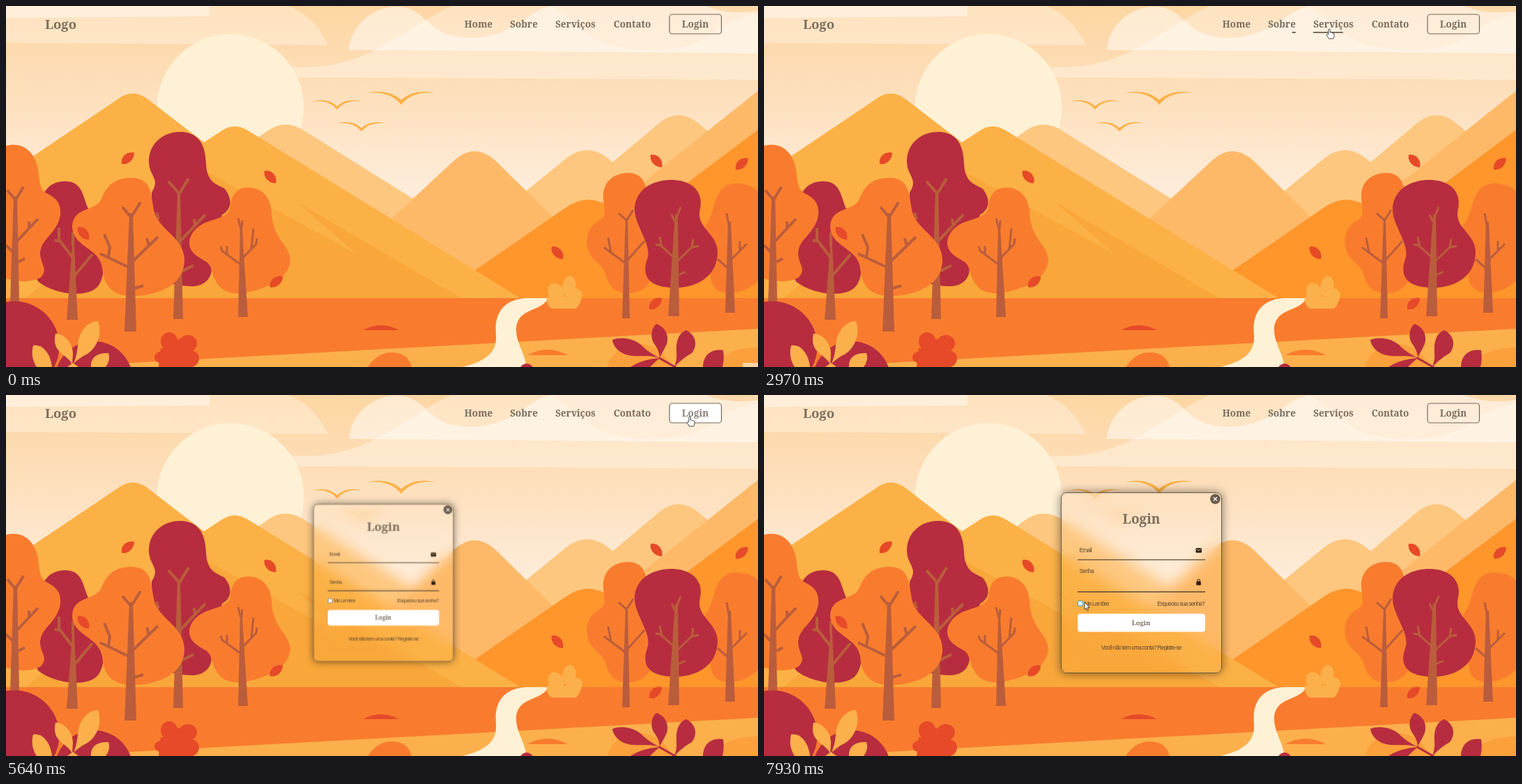
These frames come from a looping animation (1079 by 519 pixels, 8000 ms). An HTML page:

```html
<!DOCTYPE html>
<html lang="pt">
<head>
<meta charset="utf-8">
<title>Login</title>
<style>
html, body { margin: 0; width: 100%; height: 100%; overflow: hidden; background: #feebd6; }
body { position: relative; }
svg { position: absolute; left: 0; top: 0; overflow: hidden; }
text { font: 700 13.5px "Noto Serif", "DejaVu Serif", serif; fill: #7a6c5d; }
.mid { text-anchor: middle; }

.gold { fill: #fcb146; }
.sand { fill: #fdc77f; }
.peach { fill: #feb968; }
.amber { fill: #fe962c; }
.orange { fill: #f97c2e; }
.wine { fill: #b72d3f; }
.red { fill: #e64a28; }
.cream { fill: #fef1d5; }
.wood { fill: #ba5d3c; stroke: none; }
.twigs { fill: none; stroke: #ba5d3c; stroke-width: 4; }
.thin { stroke-width: 3; }
.cloud { fill: #fff; }

.line { position: absolute; top: 37px; height: 2px; background: #7a6c5d; animation: 8s ease infinite; }
#home { left: 658px; width: 40px; animation-name: home; }
#sobre { left: 723px; width: 40px; animation-name: sobre; }
#servicos { left: 788px; width: 58px; animation-name: servicos; }
#contato { left: 871px; width: 55px; animation-name: contato; }
@keyframes home {
  0%, 15.375% { clip-path: inset(0 100% 0 0); }
  21.625%, 24.5% { clip-path: inset(0 0 0 0); }
  30.75%, 100% { clip-path: inset(0 0 0 100%); }
}
@keyframes sobre {
  0%, 25.375% { clip-path: inset(0 100% 0 0); }
  31.625%, 33.5625% { clip-path: inset(0 0 0 0); }
  39.8125%, 100% { clip-path: inset(0 0 0 100%); }
}
@keyframes servicos {
  0%, 34.375% { clip-path: inset(0 100% 0 0); }
  40.625%, 43.125% { clip-path: inset(0 0 0 0); }
  49.375%, 100% { clip-path: inset(0 0 0 100%); }
}
@keyframes contato {
  0%, 45.25% { clip-path: inset(0 100% 0 0); }
  51.5%, 53.375% { clip-path: inset(0 0 0 0); }
  59.625%, 100% { clip-path: inset(0 0 0 100%); }
}

#enter rect { stroke: #756a5e; stroke-width: 1.2; fill: transparent; animation: enter 8s step-end infinite; }
#enter text { animation: enterText 8s step-end infinite; }
@keyframes enter { 0%, 71.875% { fill: transparent; } 65.3% { fill: #fff; } }
@keyframes enterText { 0%, 71.875% { fill: #7a6c5d; } 65.3% { fill: #8c8078; } }

#corner { animation: corner 8s step-end infinite; }
@keyframes corner { 0% { opacity: 1; } .875%, 100% { opacity: 0; } }

#modal {
  position: absolute; left: 426px; top: 139.5px; width: 231px; height: 260px; box-sizing: border-box;
  border: 1.4px solid #6b5b45; border-radius: 8px; box-shadow: 0 0 14px rgba(0, 0, 0, .5);
  backdrop-filter: blur(10px); animation: open 8s ease infinite;
}
#modal svg { left: -1px; top: -1px; }
@keyframes open {
  0%, 66.875% { transform: scale(0); }
  73.125%, 100% { transform: scale(1); }
}
.small { font: 8.3px "Liberation Sans", Arial, sans-serif; letter-spacing: -.75px; fill: #5e4a33; }
.rule { stroke: #5b4a35; stroke-width: 1.3; }
.icon { fill: #2e2012; }
#email { animation: email 8s ease infinite; }
#senha { animation: senha 8s ease infinite; }
@keyframes email {
  0%, 80% { transform: none; }
  86.25%, 90.5% { transform: translateY(-16px); }
  96.75%, 100% { transform: none; }
}
@keyframes senha {
  0%, 90.5% { transform: none; }
  96.75%, 100% { transform: translateY(-16px); }
}
#check { fill: #fff; stroke: #777; stroke-width: .9; animation: check 8s step-end infinite; }
@keyframes check { 0% { stroke: #777; } 97.5%, 100% { stroke: #2a8fc9; } }

#cursor { animation: move 8s linear infinite; }
#cursor path { fill: #fff; stroke: #333; stroke-width: .9; stroke-linejoin: round; }
#arrow { animation: arrow 8s step-end infinite; }
#hand { animation: hand 8s step-end infinite; }
#beam { animation: beam 8s step-end infinite; }
#cursor #beam path { fill: none; stroke: #222; stroke-width: 1; }
@keyframes move {
  0% { transform: translate(1079px, 525px); }
  .875% { transform: translate(1068px, 516px); }
  5%, 7.5% { transform: translate(661px, 266px); }
  15.375% { transform: translate(686px, 36px); }
  17%, 23.4% { transform: translate(688px, 34px); }
  24.5% { transform: translate(702px, 34px); }
  27.5% { transform: translate(735px, 33px); }
  30% { transform: translate(742px, 34px); }
  33.5625% { transform: translate(766px, 34px); }
  37.125% { transform: translate(811px, 33px); }
  41.25% { transform: translate(820px, 34px); }
  43.125% { transform: translate(847px, 34px); }
  48.375% { transform: translate(897px, 34px); }
  51.25% { transform: translate(905px, 34px); }
  53.375% { transform: translate(927px, 38px); }
  56% { transform: translate(948px, 46px); }
  58.75%, 71% { transform: translate(981px, 31px); }
  75.125% { transform: translate(608px, 208px); }
  76.625% { transform: translate(543.5px, 217px); }
  80% { transform: translate(512px, 220px); }
  85.375% { transform: translate(507px, 247px); }
  88%, 90.5% { transform: translate(522px, 268px); }
  99.125%, 100% { transform: translate(460px, 298px); }
}
@keyframes arrow {
  0%, 24.5%, 33.5625%, 43.125%, 53.375%, 71.875%, 95%, 100% { opacity: 1; }
  15.375%, 25.375%, 34.375%, 45.25%, 58.125%, 75.125% { opacity: 0; }
}
@keyframes hand {
  0%, 24.5%, 33.5625%, 43.125%, 53.375%, 71.875%, 100% { opacity: 0; }
  15.375%, 25.375%, 34.375%, 45.25%, 58.125% { opacity: 1; }
}
@keyframes beam { 0%, 95%, 100% { opacity: 0; } 75.125% { opacity: 1; } }
</style>
</head>
<body>
<svg width="1079" height="519" viewBox="0 0 1079 519">
  <defs>
    <linearGradient id="sky" x2="0" y2="1">
      <stop stop-color="#fdd6a3"/><stop offset=".5" stop-color="#fde0bd"/><stop offset="1" stop-color="#feeddb"/>
    </linearGradient>
    <path id="leaf" class="red" d="M-12 0C-8-8 5-10 12 0C6 7-6 8-12 0Z"/>
    <path id="bird" class="gold" d="M-35-12Q-13-17 0-5Q13-17 35-12Q11-14.500 0 0Q-11-14.500-35-12Z"/>
  </defs>
  <rect width="1079" height="270" fill="url(#sky)"/>

  <!-- clouds -->
  <path class="cloud" opacity=".3" d="M0 0H405C432 10 450 32 462 56L0 53Z"/>
  <path class="cloud" opacity=".4" d="M0 0H292V15L0 17Z"/>
  <path class="cloud" opacity=".32" d="M340 70C400 95 470 95 530 63C585 34 610 12 640 0H1079V106L340 102Z"/>
  <path class="cloud" opacity=".5" d="M492 63C495 28 525 1 560 1C598 1 602 30 632 40C680 56 722 36 748 17C762 6 775 0 790 0H1079V68Z"/>
  <path fill="#fde3c6" opacity=".35" d="M782 0C812 18 826 40 856 52C905 70 975 68 1010 42C1035 24 1058 14 1079 12V0Z"/>
  <path fill="#fdd9ab" d="M1004 0Q1040 14 1079 7V0Z"/>

  <circle class="cream" cx="322" cy="146" r="105.5"/>

  <!-- mountains -->
  <path class="sand" d="M340 205L376 179Q400 163 425 177.500L640 312V420H340Z"/>
  <path class="sand" d="M690 312L805 218Q833 197 861 217L900 247V420H690Z"/>
  <path class="sand" d="M820 267L940 166Q965 148 990 166L1040 206V420H820Z"/>
  <path class="peach" d="M430 420L643 222Q673 195 703 223L905 422Z"/>
  <path class="peach" d="M1079 122L790 353V420H1079Z"/>
  <path class="amber" d="M1079 178L850 350V420H1079Z"/>
  <path class="amber" d="M615 420L803 290Q832 269 862 286L1000 380V420Z"/>
  <path class="gold" d="M0 242L162 133Q183 118 204 134.500L284 196L310 179Q328 167 347 179L738 420H0Z"/>
  <path fill="#f9a73a" d="M285 237L502 356L418 282L653 420H28L130 335Z"/>

  <use href="#bird" x="475" y="149"/>
  <use href="#bird" transform="translate(567 142) scale(1.4)"/>
  <use href="#bird" x="510" y="180.500"/>

  <!-- ground -->
  <path class="orange" d="M0 420H1079V519H0Z"/>
  <path fill="#fcb04c" d="M0 523L180 513L1079 464V519H0Z"/>
  <path class="cream" d="M778 420H745C707 423 701 450 703 472C705 496 692 510 655 519H746C746 500 731 485 732 463C735 433 769 440 778 420Z"/>
  <path class="red" d="M512 466Q538 452 564 466Z"/>
  <path class="orange" d="M748 502Q777 486 806 502Z"/>
  <path class="orange" d="M519 519Q533 498 553 498Q577 498 582 519Z"/>
  <circle class="wine" cx="747" cy="524" r="10"/>
  <g fill="#fcb04c">
    <path d="M783 435Q774 429 776 418H826Q825 428 818 435Z"/>
    <ellipse cx="789" cy="412" rx="11" ry="14" transform="rotate(-25 789 412)"/>
    <ellipse cx="808" cy="403" rx="9.500" ry="15" transform="rotate(8 808 403)"/>
    <ellipse cx="817" cy="415" rx="10" ry="9"/>
  </g>

  <!-- left trees -->
  <path class="wine" d="M85 252C112 252 110 278 120 295C138 325 150 385 130 405C112 421 66 413 46 396C35 378 54 360 50 330C45 300 44 252 85 252Z"/>
  <path class="wood" d="M87 451L95 345H98L103 451Z"/>
  <path class="twigs" d="M96 362L76 336V319M77 338L70 337M98 388L124 357M96 345V325"/>
  <path class="orange" d="M0 201C22 195 39 207 45 230C49 248 46 262 58 269C74 277 79 285 78 300C74 328 48 335 49 357C50 372 61 378 50 390C36 398 18 397 0 392Z"/>
  <path class="wood" d="M6 425L11 274H16L19 425Z"/>
  <path class="twigs" d="M13 280L25 260M13 278L2 265M16 338L46 306M33 320V310M10 354L0 344M18 368L27 363"/>
  <path class="wine" d="M250 181C223 181 205 200 205 223C205 245 222 248 209 268V385C228 399 248 403 268 403C290 402 299 385 293 368L310 300C328 290 322 272 313 262C300 256 288 252 287 226C286 200 277 181 250 181Z"/>
  <path class="wood" d="M240 450L246 266H250L254 450Z"/>
  <path class="twigs" d="M248 271L262 248M248 269L233 252M250 338L286 300M271 315L270 306M219 307L216 297M251 382L269 373"/>
  <path class="orange" d="M347 261C367 261 379 274 381 295C382 337 408 342 408 367C405 394 370 407 345 412C322 416 308 409 302 397C293 382 297 376 288 368C276 361 263 355 263 340C264 325 276 315 290 310C309 304 320 300 322 290C323 272 331 261 347 261Z"/>
  <path class="wood" d="M333 447L336 320H339L347 447Z"/>
  <path class="twigs thin" d="M338 325L333 305M340 362L359 342L360 334M352 349L355 320M337 372L310 352L308 346M317 357V345M338 320L339 308"/>
  <path class="orange" d="M180 247C152 247 143 262 136 279C128 295 95 289 95 318C96 346 134 348 138 376C140 402 152 418 185 417C222 415 256 400 256 365C255 334 225 325 214 300C207 279 213 247 180 247Z"/>
  <path class="wood" d="M170 468L177 298H182L187 468Z"/>
  <path class="twigs" d="M180 303L193 282M179 303L167 289M182 367L218 332M205 345L202 334M179 377L135 356M147 361L149 347L141 328M184 406L197 402"/>

  <!-- right trees -->
  <path class="orange" d="M893 240C870 240 855 255 857 277C859 298 862 302 850 309C830 320 831 345 838 357C846 370 857 372 861 388C865 403 874 413 893 413C915 413 926 399 930 380L920 275C919 258 915 240 893 240Z"/>
  <path class="wood" d="M884 449L889 305H892L895 449Z"/>
  <path class="twigs thin" d="M890 309L900 293M890 308L879 298M892 365L916 338M889 370L858 347M868 354L864 333"/>
  <path class="orange" d="M1048 255Q1067 255 1079 266V395C1062 412 1038 416 1024 410C1013 405 1012 395 1010 385L1003 315C1019 302 1012 255 1048 255Z"/>
  <path class="wood" d="M1032 441L1036 310H1040L1046 441Z"/>
  <path class="twigs thin" d="M1038 320L1034 298M1040 365L1063 342M1053 351V338M1037 378L1021 364"/>
  <path class="wine" d="M955 250C985 250 1001 268 996 291C989 320 1021 325 1021 355C1020 390 990 405 960 405C924 405 911 390 920 364C928 344 902 316 902 293C902 266 925 250 955 250Z"/>
  <path class="wood" d="M950 446L960 300H964L966 446Z"/>
  <path class="twigs thin" d="M962 304L968 289M961 312L955 300M964 366L984 347L994 345M984 347L986 335M960 363L939 344L932 343M941 347L938 332M964 387L975 382"/>

  <g>
    <use href="#leaf" transform="translate(175 219) rotate(-42)"/>
    <use href="#leaf" transform="translate(379 246) rotate(47)"/>
    <use href="#leaf" transform="translate(111 327) rotate(48)"/>
    <use href="#leaf" transform="translate(388 396.500) rotate(-40)"/>
    <use href="#leaf" transform="translate(933 223) rotate(48)"/>
    <use href="#leaf" transform="translate(1056 227) rotate(-43)"/>
    <use href="#leaf" transform="translate(791 355) rotate(47)"/>
    <use href="#leaf" transform="translate(932 428) rotate(-42)"/>
  </g>

  <!-- foreground plants -->
  <circle class="wine" cx="12" cy="489" r="64.500"/>
  <circle class="wine" cx="126" cy="538" r="56"/>
  <g fill="#fcb04c">
    <path d="M97 514C101 504 102 498 103 488C104 470 116 453 132 453C138 470 132 490 117 500Q106 505 97 514Z"/>
    <path d="M95 515C90 506 84 504 78 498C69 490 69 480 71 471C86 472 96 486 96 500Z"/>
    <path d="M44 519C38 510 36 499 39 488C53 486 64 500 66 519Z"/>
    <path d="M122 519C121 506 130 498 147 499C150 508 146 515 143 519Z"/>
    <path d="M88 519L96 513L104 519Z"/>
  </g>
  <g class="red">
    <ellipse cx="234" cy="482" rx="12" ry="13"/><ellipse cx="261" cy="485" rx="13" ry="12"/>
    <ellipse cx="225" cy="505" rx="12" ry="9"/><circle cx="265" cy="507" r="12"/>
    <circle cx="246" cy="493" r="14"/><path d="M222 492H268V519H219Z"/>
  </g>
  <ellipse fill="#fca03c" cx="908" cy="526" rx="46" ry="40"/>
  <ellipse fill="#fca03c" cx="1076" cy="526" rx="62" ry="35"/>
  <g class="wine">
    <path d="M938 506C925 502 915 504 900 503C883 502 872 492 870 480C886 474 905 480 914 490Q922 498 938 506Z"/>
    <path d="M938 505Q937 495 931 487C924 478 925 464 933 457C946 461 952 474 948 486Q944 495 938 505Z"/>
    <path d="M959 519Q963 508 962 498C961 482 965 470 976 466C990 473 993 488 984 499Q971 506 959 519Z"/>
    <path d="M1000 519C1000 504 1010 492 1029 495Q1031 508 1028 519Z"/>
    <path d="M896 519Q912 508 938 506Q930 513 924 519Z"/>
    <path d="M937 504L963 519H957L936 507Z"/>
  </g>
  <path id="corner" fill="#fdd5a0" d="M1057 513H1079V519H1057Z"/>

  <!-- header -->
  <text class="mid" x="78.500" y="33" style="font-size:18.500px">Logo</text>
  <text class="mid" x="678" y="31">Home</text>
  <text class="mid" x="743" y="31">Sobre</text>
  <text class="mid" x="817" y="31">Serviços</text>
  <text class="mid" x="898.500" y="31">Contato</text>
  <g id="enter">
    <rect x="952" y="12" width="74.500" height="28" rx="4"/>
    <text class="mid" x="989" y="31">Login</text>
  </g>
</svg>

<i class="line" id="home"></i>
<i class="line" id="sobre"></i>
<i class="line" id="servicos"></i>
<i class="line" id="contato"></i>

<div id="modal">
  <svg width="231" height="260" viewBox="426 139.500 231 260">
    <circle cx="647.500" cy="149" r="7.300" fill="#6b5d4c"/>
    <path d="M645 146.500l5 5m0-5l-5 5" stroke="#fff" stroke-width="1.200"/>
    <text class="mid" x="541.500" y="184" style="font-size:19px">Login</text>
    <path class="rule" d="M450 236.300H633M450 282.500H633"/>
    <text class="small" id="email" x="452.500" y="225">Email</text>
    <text class="small" id="senha" x="452.500" y="271">Senha</text>
    <rect class="icon" x="619.500" y="219.500" width="8.500" height="6.800" rx="1"/>
    <path d="M620.500 221l3.200 2.200l3.300-2.200" fill="none" stroke="#fdd9a8" stroke-width=".9"/>
    <rect class="icon" x="620.300" y="267.500" width="6.600" height="5.500" rx="1"/>
    <path d="M621.800 268v-1.500a1.800 1.800 0 0 1 3.600 0V268" fill="none" stroke="#2e2012" stroke-width="1.100"/>
    <rect id="check" x="450.500" y="295.700" width="6.800" height="6.800" rx="1"/>
    <text class="small" x="459.500" y="302">Me Lembre</text>
    <text class="small" x="632" y="302" text-anchor="end">Esqueceu sua senha?</text>
    <rect x="450" y="314" width="183" height="26" rx="4" fill="#fff"/>
    <text class="mid" x="541" y="330.500" style="font-size:9.400px">Login</text>
    <text class="small mid" x="541.300" y="365">Você não tem uma conta? Registre-se</text>
  </svg>
</div>

<svg width="1079" height="519" viewBox="0 0 1079 519">
  <g id="cursor">
    <g id="arrow"><path d="M0 0V10.500L2.400 8.300L4 12L5.600 11.300L4 7.700H7.200Z"/></g>
    <g id="hand"><path d="M-1.200 8V1.200Q-1.200 0 0 0T1.200 1.200V5Q3 4.300 3.400 5.600Q5 5 5.300 6.200Q7 5.800 7 7.400V10Q7 12 5.600 14H-.6Q-1.500 12-4 9.200Q-4 7.400-2.600 7.600Z"/></g>
    <g id="beam"><path d="M-2.500-4.500H2.500M0-4.500V4.500M-2.500 4.500H2.500"/></g>
  </g>
</svg>
</body>
</html>
```
